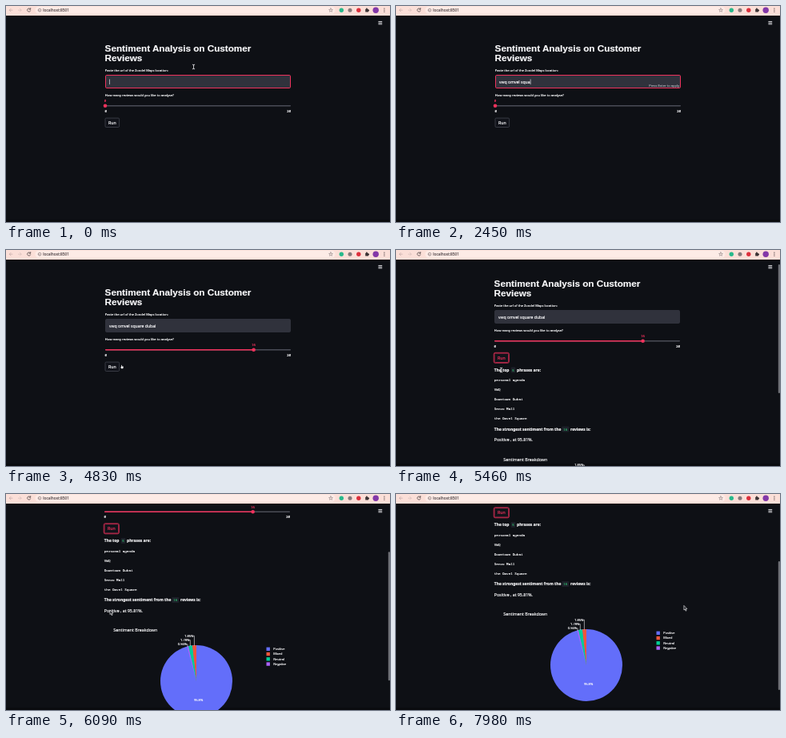
Write an HTML page that moves like this. It is 480x270 px and loops after 8000 ms.

```html
<!DOCTYPE html>
<html lang="en">
<head>
<meta charset="utf-8">
<title>Sentiment Analysis on Customer Reviews</title>
<style>
  html, body { margin: 0; width: 100%; height: 100%; overflow: hidden; background: #0e1015; }
  svg { display: block; width: 100vw; height: 100vh; }
  text {
    font-family: "Noto Sans", "Open Sans", sans-serif; white-space: pre;
    color: #fafafc; fill: currentColor; stroke: currentColor; stroke-width: .16px;
  }
  .title { font-family: "Liberation Sans", Arial, sans-serif; font-weight: 700; }
  .bold { font-weight: 700; }
  .mono { font-family: "Noto Sans Mono", "DejaVu Sans Mono", monospace; }
  .chart { font-family: "Open Sans", "Noto Sans", sans-serif; }
  .end { text-anchor: end; }
  .mid { text-anchor: middle; }
</style>
</head>
<body>
<svg viewBox="0 0 480 270" xmlns="http://www.w3.org/2000/svg">
  <defs><clipPath id="view"><rect y="12" width="480" height="258"/></clipPath></defs>
  <rect width="480" height="270" fill="#0e1015"/>
  <rect y="267" width="480" height="3" fill="#0a0b0f"/>
  <g clip-path="url(#view)"><g id="page"></g></g>
  <g id="chrome"></g>
  <g id="pointer"></g>
</svg>
<script>
const NS = "http://www.w3.org/2000/svg";
const LOOP = 8000, STEP = 70;
const RED = "#ee325c", GREEN = "#2bb067";
const QUERY = "vwq omvel square dubai";
const LEFT = 124, WIDTH = 232, MAX = 20;

const byId = id => document.getElementById(id);

function add(parent, tag, attrs) {
  const el = document.createElementNS(NS, tag);
  for (const k in attrs) el.setAttribute(k, attrs[k]);
  return parent.appendChild(el);
}
function label(parent, x, y, size, str, cls = "", color) {
  const el = add(parent, "text", { x, y, "font-size": size, class: cls });
  if (color) el.style.color = color;
  el.textContent = str;
  return el;
}
const box = (parent, x, y, width, height, fill, rx = 0) =>
  add(parent, "rect", { x, y, width, height, fill, rx });
const dot = (parent, cx, cy, r, fill) => add(parent, "circle", { cx, cy, r, fill });
const line = (parent, d, stroke, w) =>
  add(parent, "path", { d, stroke, "stroke-width": w, fill: "none", "stroke-linecap": "round", "stroke-linejoin": "round" });
const show = (el, on) => { el.style.display = on ? "" : "none"; };

// Piecewise linear track: rows of [time, value, value...]
function track(rows, t) {
  if (t <= rows[0][0]) return rows[0].slice(1);
  for (let i = 1; i < rows.length; i++) {
    const a = rows[i - 1], b = rows[i];
    if (t <= b[0]) {
      const k = (t - a[0]) / (b[0] - a[0]);
      return a.slice(1).map((v, j) => v + (b[j + 1] - v) * k);
    }
  }
  return rows[rows.length - 1].slice(1);
}

// Browser bar
const chrome = byId("chrome");
box(chrome, 0, 0, 480, 12, "#fbdfd8");
box(chrome, 36.5, .8, 375, 9, "#fdebe6", 4.5);
line(chrome, "M8 5.2H4.4M6 3.4L4.2 5.2L6 7", "#c2a9a6", .7);
line(chrome, "M15.4 5.2H19M17.4 3.4L19.2 5.2L17.4 7", "#d6bfbb", .7);
line(chrome, "M30.4 3.8A2.1 2.1 0 1 0 30.7 5.8M30.7 2.6V4.2H29.1", "#55494b", .8);
line(chrome, "M40.2 5.2a1.9 1.9 0 1 0 3.8 0a1.9 1.9 0 1 0 -3.8 0M42.1 5V6.2", "#776b6d", .6);
label(chrome, 46.2, 7, 4.87, "localhost:8501", "", "#5a5053");
const star = [...Array(10)].map((_, i) => {
  const a = i * Math.PI / 5, r = i % 2 ? 1.1 : 2.5;
  return (406 + r * Math.sin(a)).toFixed(2) + " " + (5.3 - r * Math.cos(a)).toFixed(2);
});
line(chrome, "M" + star.join("L") + "Z", "#776b6d", .5);
dot(chrome, 419.3, 5.2, 2.7, "#27b98b");
dot(chrome, 430, 5.2, 2.5, "#85797a");
dot(chrome, 440.8, 5.2, 2.7, "#dc2f3c");
box(chrome, 449.2, 3.7, 3.8, 3.8, "#3c3335", .5);
dot(chrome, 450.9, 3.4, .9, "#3c3335");
dot(chrome, 453.2, 5.5, .9, "#3c3335");
dot(chrome, 462.2, 5.2, 3.7, "#8338a8");
for (const y of [3.2, 5.2, 7.2]) dot(chrome, 472.9, y, .6, "#55494b");
for (const y of [19.4, 21.1, 22.8]) box(chrome, 465.4, y - .45, 4.8, .9, "#e4e4e8");
const scrollbar = box(chrome, 477.8, 12, 2.2, 161, "#6d6f75", 1);

// Form
const page = byId("page");
label(page, 123.6, 56.9, 11.7, "Sentiment Analysis on Customer", "title");
label(page, 123.6, 69, 11.7, "Reviews", "title");
label(page, 123.8, 81.6, 4.05, "Paste the url of the Zondel Maps location:");
const field = add(page, "rect", { x: 124.5, y: 86.5, width: 231, height: 16, rx: 1.2, fill: "#30323c", "stroke-width": 1 });
const typed = label(page, 129, 96.6, 5.1, "");
const caret = box(page, 129, 91.5, .6, 6.6, "#f6f6f8");
const hint = label(page, 354, 101.2, 4.05, "Press Enter to apply", "end", "#a3a5ad");

label(page, 123.8, 113.3, 4.05, "How many reviews would you like to analyse?");
box(page, LEFT, 123.9, WIDTH, 1.6, "#4a4c56", .7);
const filled = box(page, LEFT, 123.9, 0, 1.6, RED, .7);
const thumb = dot(page, LEFT, 124.7, 2.3, RED);
const amount = label(page, LEFT, 120.3, 4.2, "0", "mono mid", RED);
label(page, 123.6, 132.7, 4.3, "0", "mono");
label(page, 356.2, 132.7, 4.3, "20", "mono end");

const glow = add(page, "rect", { x: 123.2, y: 139.3, width: 19.2, height: 13, rx: 1.8, fill: "none", stroke: RED, "stroke-opacity": .7, "stroke-width": 1 });
const button = add(page, "rect", { x: 124, y: 140.1, width: 17.6, height: 11.4, rx: 1.3, fill: "#11131a", "stroke-width": .7 });
const run = label(page, 132.9, 147.8, 5.2, "Run", "mid");

// Results
const results = add(page, "g", {});
function heading(y, before, chip, x, w, after) {
  label(results, 123.8, y, 4.95, before, "bold");
  box(results, x, y - 5.1, w, 6.8, "#1d2029", .8);
  label(results, x + w / 2, y - .2, 4.2, chip, "mono mid", GREEN);
  label(results, x + w + 1.7, y, 4.95, after, "bold");
}
heading(162.7, "The top", "5", 144.7, 5.6, "phrases are:");
["personal agenda", "VWQ", "Downtown Dubai", "Senvo Mall", "the Omvel Square"]
  .forEach((s, i) => label(results, 123.8, 175.4 + 12 * i, 4.25, s, "mono"));
heading(236.7, "The strongest sentiment from the", "16", 208.3, 9, "reviews is:");
label(results, 123.8, 250.3, 5.2, "Positive , at 95.81%.");

label(results, 135.3, 274.5, 5.35, "Sentiment Breakdown", "chart");
const CX = 239, CY = 336.5, R = 45;
const shares = [["Mixed", 1.85, "#ef553b"], ["Neutral", 1.78, "#00cc96"], ["Negative", .56, "#ab63fa"]];
const colors = { Positive: "#636efa" };
dot(results, CX, CY, R, colors.Positive);
let turn = 0;
const rim = p => {
  const a = p / 100 * 2 * Math.PI;
  return [CX - R * Math.sin(a), CY - R * Math.cos(a)];
};
shares.forEach(([name, share, color], i) => {
  const a = rim(turn), b = rim(turn + share), m = rim(turn + share / 2);
  add(results, "path", { d: `M${CX} ${CY}L${a}A${R} ${R} 0 0 0 ${b}Z`, fill: color });
  const y = 279.8 + 5.3 * i, x = m[0];
  line(results, `M${x} ${m[1]}V${y}H${x - .9}`, "#f0f0f4", .6);
  label(results, x - 1, y + 1.4, 4, share.toFixed(2) + "%", "chart end");
  colors[name] = color;
  turn += share;
});
label(results, 241.6, 361, 4, "95.8%", "chart mid");
["Positive", "Mixed", "Neutral", "Negative"].forEach((name, i) => {
  const y = 296.3 + 6.25 * i;
  box(results, 326.5, y - 2.2, 4.4, 4.4, colors[name]);
  label(results, 335.3, y + 1.4, 3.9, name, "chart");
});

// Pointer shapes
const pointer = byId("pointer");
const shapes = {
  beam: add(pointer, "g", {}),
  hand: add(pointer, "g", {}),
  arrow: add(pointer, "g", {})
};
line(shapes.beam, "M-1.2 -2.8Q0 -2.8 0 -2Q0 -2.8 1.2 -2.8M0 -2V2M-1.2 2.8Q0 2.8 0 2Q0 2.8 1.2 2.8", "#f4f4f6", .8);
add(shapes.hand, "path", {
  d: "M-1 -2Q-.4 -2.6 0 -2V-.8L1.6 -.4Q2.1 0 1.8 1L1.2 2.3H-.9L-2 .6Q-1.8 0 -1 .4Z",
  fill: "#fff", stroke: "#20222a", "stroke-width": .3
});
add(shapes.arrow, "path", {
  d: "M-1.6 -3.6V2L-.3 .9L.6 3.2L1.6 2.7L.6 .6H2.4Z",
  fill: "#16181f", stroke: "#fff", "stroke-width": .6
});

// Timeline
const KEYS = [1050, 1190, 1330, 1400, 1540, 1610, 1750, 1820, 1960, 2030, 2170,
  2310, 2380, 2450, 2590, 2660, 2730, 2800, 2870, 2940, 2940, 3010];
const ENTER = 3220, BLUR = 3430, GRAB = 3500, DROP = 4200, CLICK = 4900, DONE = 5180;
const SCROLL = [[5390, 0], [5460, 11], [5740, 75.5], [6090, 102.5], [6230, 107], [6650, 107], [6860, 122.5]];
const MOUSE = [[ENTER, 234.5, 76], [BLUR, 125, 124.5], [GRAB, 126, 124.5], [3780, 237, 124.3], [4060, 300, 124.5],
  [DROP, 309.5, 124.5], [4340, 309.5, 125], [4830, 145, 146], [CLICK, 134, 147], [5460, 131.5, 150],
  [5740, 130.6, 149.3], [6090, 131.5, 148.5], [7210, 131.5, 148.5], [7980, 361.5, 143]];

function shapeAt(t) {
  if (t < KEYS[0]) return "beam";
  if (t < ENTER) return "";
  if (t < 3360) return "beam";
  if (t < 5320) return "hand";
  return t < 5530 ? "beam" : "arrow";
}

function draw(now) {
  const t = Math.floor((now % LOOP) / STEP) * STEP;
  const focused = t < BLUR, clicked = t >= CLICK, done = t >= DONE;

  const count = KEYS.filter(k => k <= t).length;
  typed.textContent = QUERY.slice(0, count);
  caret.setAttribute("x", 129.2 + (count ? typed.getComputedTextLength() : 0));
  show(caret, focused && !(t >= 560 && t < KEYS[0]));
  show(hint, count > 0 && t < ENTER);
  field.setAttribute("stroke", focused ? RED : "#30323c");

  const value = Math.round(track([[GRAB, 0], [DROP, 16]], t)[0]);
  const x = LEFT + WIDTH * value / MAX;
  filled.setAttribute("width", x - LEFT);
  thumb.setAttribute("cx", x);
  amount.setAttribute("x", x);
  amount.textContent = value;

  button.setAttribute("stroke", clicked ? RED : "#4a4c56");
  run.style.color = clicked ? RED : "";
  show(glow, clicked);

  const [scroll] = track(SCROLL, t);
  show(results, done);
  show(scrollbar, done);
  scrollbar.setAttribute("y", 11.5 + .592 * scroll);
  page.setAttribute("transform", `translate(${done ? -1 : 0} ${-scroll})`);

  const shape = shapeAt(t);
  for (const k in shapes) show(shapes[k], k === shape);
  pointer.setAttribute("transform", `translate(${track(MOUSE, t)})`);
}

function tick() {
  draw(performance.now());
  requestAnimationFrame(tick);
}
tick();
</script>
</body>
</html>
```
